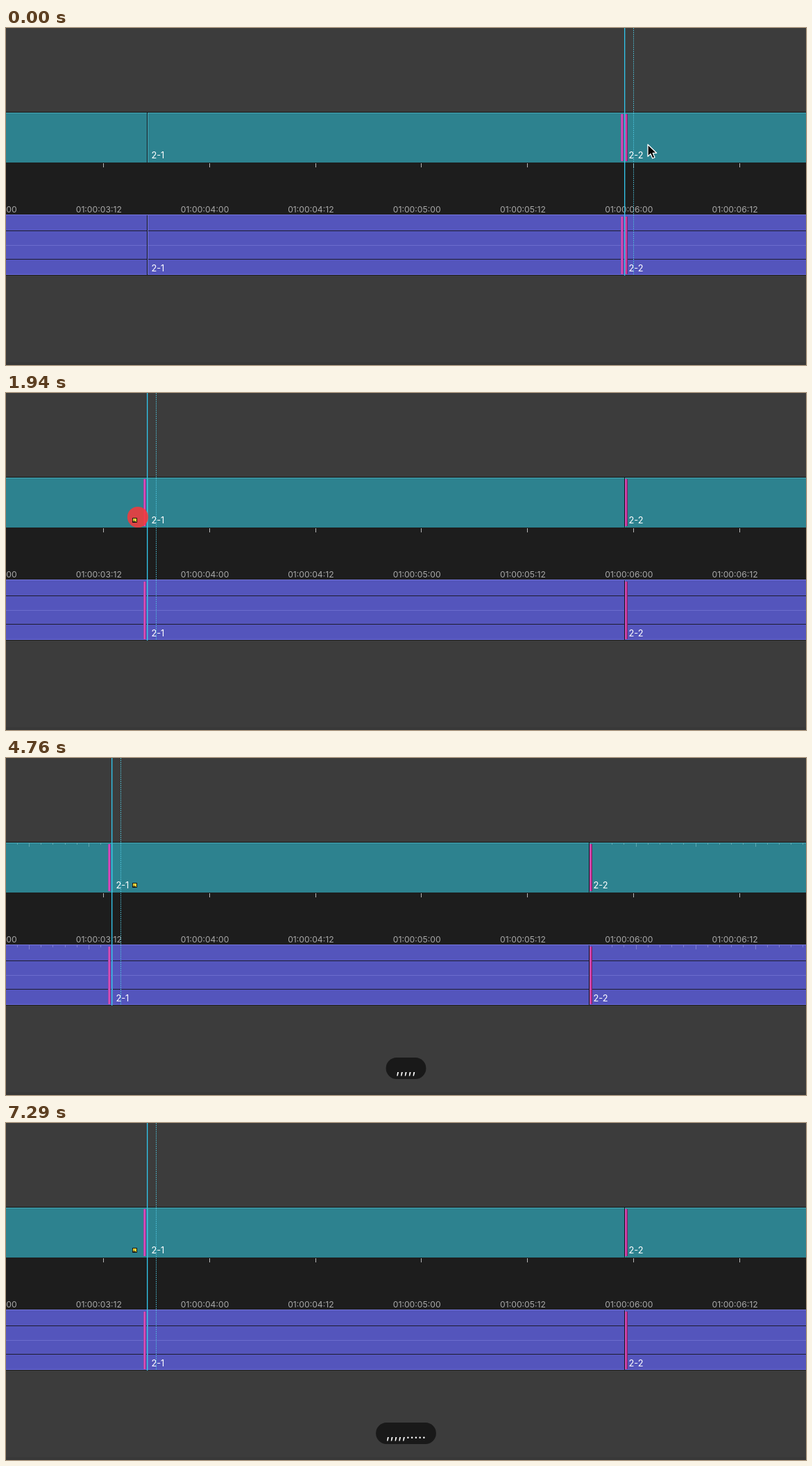
An HTML page that plays this animation: 1153x486 px, repeating every 8.41 s.

```html
<!DOCTYPE html>
<html lang="en">
<head>
<meta charset="utf-8">
<title>Slide trim</title>
<style>
html, body { margin: 0; width: 100%; height: 100%; overflow: hidden; background: #3c3c3c; }
svg { display: block; width: 100%; height: 100%; font-family: Inter, "Open Sans", sans-serif; }
rect { shape-rendering: crispEdges; }
.time { font-size: 12.2px; fill: #a9a9a9; text-anchor: middle; }
.clip { font-size: 12.8px; fill: #fff; }
.keys { font-size: 20px; fill: #fff; text-anchor: middle; }
</style>
</head>
<body>
<svg id="stage" viewBox="0 0 1153 486"></svg>
<script>
const LOOP = 8410, HALF_SECOND = 152.8, FRAME = HALF_SECOND / 12;
const CUT_IN = 203, CUT_OUT = 891;
const PRESSES = [3530, 3940, 4240, 4470, 4760, 5180, 5410, 5650, 5880, 6120];
const MOVES = [3760, 4000, 4290, 4530, 4820, 5240, 5470, 5710, 5940, 6180];
const SELECT = 1770, CLICK = 1710, CLICK_END = 2410, HANDLES_END = 7290;
const stage = document.getElementById('stage');

function add(tag, attrs, parent = stage, text = '') {
  const el = document.createElementNS('http://www.w3.org/2000/svg', tag);
  set(el, attrs);
  el.textContent = text;
  return parent.appendChild(el);
}
function set(el, attrs) {
  for (const key in attrs) el.setAttribute(key, attrs[key]);
}
const box = (x, y, width, height, fill, parent) => add('rect', { x, y, width, height, fill }, parent);
const group = () => add('g', {});
const shift = (el, x, y = 0) => set(el, { transform: `translate(${x} ${y})` });
const show = (el, on) => set(el, { visibility: on ? 'visible' : 'hidden' });

// Tracks and ruler
box(0, 0, 1153, 486, '#3c3c3c');
box(0, 482, 1153, 4, '#383838');
box(0, 121, 1153, 236, '#1d1d1d');
box(0, 121, 1153, 1, '#151515');
box(0, 122, 1153, 72, '#2d828f');
box(0, 122, 1153, 1, '#46a9b7');
box(0, 269, 1153, 87, '#5455bc');
box(0, 269, 1153, 1, '#7475dc');
box(0, 313, 1153, 1, '#6b6cce');
box(0, 355, 1153, 1, '#6a6be0');
for (const y of [292, 333]) box(0, y, 1153, 1, '#1d1d30');

for (let i = 0; i < 8; i++) {
  const x = -12.4 + i * HALF_SECOND;
  const half = i + 6;
  box(Math.floor(x), 195, 1, 6, '#b5b5b5');
  add('text', { x: x - 6.6, y: 266, class: 'time' }, stage,
    `01:00:0${half >> 1}:${half % 2 ? '12' : '00'}`);
}

// Media handle ticks
const handles = group();
function tickRow(from, count, majorAt) {
  for (let i = 0; i < count; i++) {
    const x = Math.floor(from + i * 17.2);
    const h = i % 5 === majorAt ? 6 : 3;
    box(x, 122, 1, h, '#5fa6b0', handles);
    box(x, 270, 1, h, '#7f80d3', handles);
  }
}
tickRow(16.3, 8, 1);
tickRow(873.7, 17, 2);

// Edit points
function makeCut(x, name) {
  const g = group();
  for (const [y, h, light] of [[122, 72, '#48a3b0'], [270, 86, '#7172d2']]) {
    box(x, y, 1, h, '#14181f', g);
    box(x + 1, y, 1, h, light, g);
  }
  for (const y of [188, 351]) add('text', { x: x + 6.4, y, class: 'clip' }, g, name);
  return g;
}
function makeBar(x, colors) {
  const g = group();
  for (const [y, h] of [[124, 68], [272, 83]])
    colors.forEach((c, i) => box(x + i, y, 1, h, c, g));
  return g;
}
const cutIn = makeCut(CUT_IN, '2-1');
const cutOut = makeCut(CUT_OUT, '2-2');
const TAIL = ['#a045a4', '#dc50bd', '#d648b4', '#84388f'];
const HEAD = ['#b848ac', '#dc4bb4', '#c4308f', '#7a2468'];
const rollBar = makeBar(CUT_OUT - 5, TAIL);
const inBar = makeBar(CUT_IN - 5, TAIL);
const outBar = makeBar(CUT_OUT + 1, HEAD);

const playhead = group();
box(0, 0, 1, 357, '#33c5ea', playhead);
box(1, 0, 1, 357, '#2d9fbd', playhead).setAttribute('opacity', .45);
add('path', { d: 'M13.5 0V357', stroke: '#4fc4dc', 'stroke-dasharray': '1.5 1.5', fill: 'none' }, playhead);

// Pointer, click ripple, key badge
const ripple = add('circle', { cx: 190, cy: 179, fill: '#f23a3c' });
const arrow = add('path', {
  d: 'M0 0V17.2L4 13.4L6.8 20L10 18.6L7.2 12.3H12.6Z',
  fill: '#000', stroke: '#fff', 'stroke-width': 1.3, 'stroke-linejoin': 'round'
});
const trim = group();
box(-8, 1, 7, 7, '#1b1b12', trim);
box(-7, 2, 4, 4, '#f0d63c', trim);
box(-6, 4, 1, 1, '#1b1b12', trim);
box(-3, 2, 1, 5, '#f0d63c', trim);

const badge = group();
const pill = add('rect', { y: 432, height: 31, rx: 15.5, fill: '#191919', style: 'shape-rendering:auto' }, badge);
const keys = add('text', { x: 576.5, y: 455.3, class: 'keys' }, badge);

const passed = (times, t) => times.filter(at => t >= at).length;

function pointerAt(t) {
  const step = t < 350 ? 0 : Math.min(15, Math.floor((t - 350) / 59.2) + 1);
  const p = step / 15, e = p * p * (3 - 2 * p);
  const nudge = t >= 1350 ? 6 : t >= 1290 ? 3 : 0;
  return {
    x: Math.round(925 - 729 * e - nudge),
    y: Math.round(168 + 11 * e + 20 * Math.sin(Math.PI * e))
  };
}

function draw(t) {
  const sliding = t >= SELECT;
  const moves = passed(MOVES, t);
  const offset = Math.round(-FRAME * Math.min(moves, 10 - moves));
  for (const el of [cutIn, cutOut, inBar, outBar]) shift(el, offset);
  shift(playhead, (sliding ? CUT_IN : CUT_OUT) + offset);
  show(rollBar, !sliding);
  show(inBar, sliding);
  show(handles, t >= MOVES[0] && t < HANDLES_END);

  const { x, y } = pointerAt(t);
  shift(arrow, x, y);
  shift(trim, x, y);
  show(arrow, x > 212);
  show(trim, x <= 212);

  const p = (t - CLICK) / (CLICK_END - CLICK);
  const rippling = p >= 0 && p < 1;
  show(ripple, rippling);
  if (rippling) set(ripple, { r: 30 * p ** .62, opacity: .98 - .95 * p * p });

  const n = passed(PRESSES, t);
  const width = 28.8 + 5.8 * n;
  show(badge, n > 0);
  set(pill, { x: 576.5 - width / 2, width });
  keys.textContent = ','.repeat(Math.min(n, 5)) + '.'.repeat(Math.max(0, n - 5));
}

const start = performance.now();
function tick() {
  draw((performance.now() - start) % LOOP);
  requestAnimationFrame(tick);
}
draw(0);
requestAnimationFrame(tick);
</script>
</body>
</html>
```
